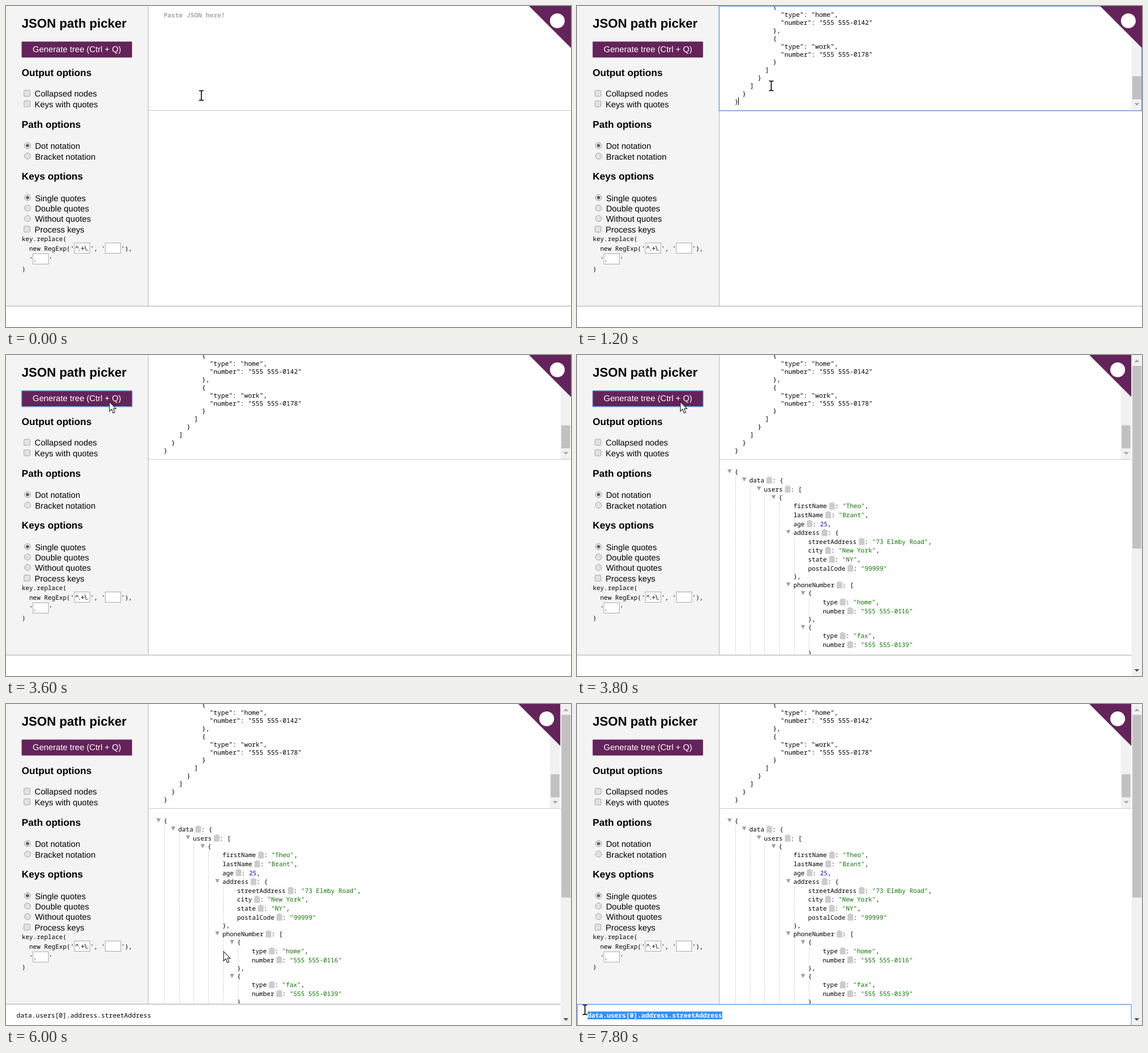
An HTML page that plays this animation: 992 px wide and 564 px high, repeating every 8000 ms.

```html
<!DOCTYPE html>
<html lang="en">
<head>
<meta charset="utf-8">
<title>JSON path picker</title>
<style>
  html, body { margin: 0; width: 100%; height: 100%; overflow: hidden; background: #fff; }
  svg { display: block; width: 992px; height: 564px; }
  text { white-space: pre; text-rendering: geometricPrecision; fill: #000; }
  .ui { font: 14.7px "Liberation Sans", Arial, sans-serif; }
  .h1 { font: bold 22.1px "Liberation Sans", Arial, sans-serif; }
  .h2 { font: bold 17.15px "Liberation Sans", Arial, sans-serif; }
  .field { font: 12.27px "Liberation Sans", Arial, sans-serif; }
  .code { font: 10.93px "Noto Sans Mono", "DejaVu Sans Mono", monospace; }
  .area { font: 11.23px "Noto Sans Mono", "DejaVu Sans Mono", monospace; }
  .path { font: 11.26px "Noto Sans Mono", "DejaVu Sans Mono", monospace; }
  .str { fill: #0b7500; }
  .num { fill: #1a01cc; }
  .hint { fill: #a9a9a9; font-weight: 600; }
  .picked { fill: #fff; font-weight: 600; }
  .focus { fill: none; stroke: #6b9fe0; stroke-width: 1.4; }
  .box { fill: #fff; stroke: #a9a9a9; }
  .tick { fill: #e2e2e2; stroke: #a6a6a6; }
  .guide { stroke: #c4c4c4; stroke-dasharray: 1 1; }
</style>
</head>
<body>
<svg viewBox="0 0 992 564">
  <defs>
    <path id="clip" d="M0-9.2h3v-.8q0-.6.6-.6h2.8q.6 0 .6.6v.8h3V2H0z"/>
    <path id="fold" d="M-3.8-3.6h7.6L0 3.6z" fill="#a0a0a0"/>
    <clipPath id="selClip"><rect id="selArea" y="535" height="25"/></clipPath>
  </defs>

  <g id="side">
    <rect width="249" height="528" fill="#f4f4f4"/>
    <path d="M249.5 0V528" stroke="#c2c2c2"/>
    <path d="M250.5 0V528" stroke="#ececec"/>
    <rect x="27.5" y="62.6" width="193.8" height="28" rx="1" fill="#64235a"/>
    <rect id="btnFocus" class="focus" x="27.5" y="62.7" width="194" height="28" rx="1"/>
    <text class="ui" x="124.5" y="81" text-anchor="middle" style="fill:#fff">Generate tree (Ctrl + Q)</text>
  </g>

  <path d="M250 183.5H992" stroke="#cacaca"/>
  <text id="hint" class="area hint" x="276.7" y="20.2">Paste JSON here!</text>
  <g id="json"></g>
  <g id="tree"></g>

  <g id="areaBar">
    <rect x="973.5" y="1" width="17.5" height="182" fill="#f1f1f1"/>
    <rect x="975" y="123.5" width="15.5" height="40.5" fill="#c1c1c1"/>
    <path d="M978.5 170.5h9l-4.5 4.5z" fill="#a3a3a3"/>
  </g>
  <rect id="areaFocus" class="focus" x="249.5" y=".5" width="742" height="183.5"/>
  <g id="ribbon">
    <path d="M918.3 0H992v73.7z" fill="#64235a"/>
    <circle cx="968" cy="26" r="13" fill="#fff"/>
  </g>
  <path id="areaCaret" stroke="#000" stroke-width="1.1"/>

  <rect y="527" width="992" height="37" fill="#fff"/>
  <g id="pathEdge">
    <path d="M0 526.7H992" stroke="#dcdcdc"/>
    <path d="M0 527.7H992" stroke="#b8b8b8"/>
  </g>
  <path id="pathFocus" class="focus" d="M.5 564V527.8H973.2V564"/>
  <g id="result">
    <text class="path" x="18.5" y="551">data.users[0].address.streetAddress</text>
    <g clip-path="url(#selClip)">
      <rect x="18.5" y="540.3" width="236.7" height="13.7" fill="#3390ff"/>
      <text class="path picked" x="18.5" y="551">data.users[0].address.streetAddress</text>
    </g>
  </g>
  <path id="pathCaret" d="M255.8 540.5V553.5" stroke="#000" stroke-width="1.1"/>

  <g id="pageBar">
    <rect x="973.7" width="18.3" height="564" fill="#f1f1f1"/>
    <rect x="975.2" y="19" width="15.8" height="321" fill="#c1c1c1"/>
    <path d="M978.5 12.5h9L983 8z" fill="#a3a3a3"/>
    <path d="M978.5 552h9l-4.5 4.5z" fill="#505050"/>
  </g>

  <g id="pointer">
    <path id="beam" d="M-4-8.3h2.5Q0-8.3 0-7 0-8.3 1.5-8.3H4M0-7.5V7.8M-4 8.6h2.5Q0 8.6 0 7.3 0 8.6 1.5 8.6H4" fill="none" stroke="#000" stroke-width="1.6"/>
    <path id="arrow" d="M.5.3V17l3.9-3.7L7 20l3-1.2-2.8-6.4h5z" fill="#fff" stroke="#26263a" stroke-width="1.1"/>
    <path id="hand" d="M-1.8 15V.8q0-1.8 1.7-1.8t1.7 1.8V8q.4-1.4 1.9-1.2 1.5.1 1.6 1.6.5-1.1 1.9-.9 1.4.2 1.5 1.7.7-.8 1.8-.4 1.2.4 1.2 2v4.8q0 2.6-1.8 4.6V24H.6v-3.2L-5.2 13q-1-1.6.2-2.4 1.2-.7 2.2.9z" fill="#fff" stroke="#000" stroke-width="1.2"/>
  </g>
</svg>

<script>
const $ = id => document.getElementById(id);

function add(parent, tag, attrs, text) {
  const node = document.createElementNS('http://www.w3.org/2000/svg', tag);
  for (const name in attrs) node.setAttribute(name, attrs[name]);
  if (text !== undefined) node.textContent = text;
  parent.appendChild(node);
  return node;
}
const write = (parent, cls, x, y, text) => add(parent, 'text', { class: cls, x, y }, text);

function buildSide() {
  const side = $('side');
  write(side, 'h1', 27.5, 38.4, 'JSON path picker');
  ['Output options', 'Path options', 'Keys options'].forEach((s, i) =>
    write(side, 'h2', 27.5, 123 + i * 91.2, s));

  const check = (y, label) => {
    add(side, 'rect', { class: 'tick', x: 31.5, y: y - 11, width: 10.6, height: 10.6, rx: 1.5 });
    write(side, 'ui', 50.3, y, label);
  };
  const radio = (y, label, on) => {
    add(side, 'circle', { class: 'tick', cx: 37.8, cy: y - 5.9, r: 5.4 });
    if (on) add(side, 'circle', { cx: 37.8, cy: y - 5.9, r: 2.7, fill: '#5c5c5c' });
    write(side, 'ui', 51, y, label);
  };
  check(159.1, 'Collapsed nodes');
  check(177.6, 'Keys with quotes');
  radio(251.2, 'Dot notation', true);
  radio(269.6, 'Bracket notation');
  radio(342.6, 'Single quotes', true);
  radio(360.9, 'Double quotes');
  radio(379.3, 'Without quotes');
  check(397.8, 'Process keys');

  const field = (x, y, text) => {
    add(side, 'rect', { class: 'box', x, y, width: 27.2, height: 18.2 });
    write(side, 'field', x + 1.8, y + 13.2, text);
  };
  write(side, 'code', 27.7, 413, 'key.replace(');
  write(side, 'code', 40.8, 429.7, "new RegExp('");
  field(120, 416.3, '^.+\\.');
  write(side, 'code', 147.8, 429.7, "', '");
  field(174.3, 416.3, '');
  write(side, 'code', 202, 429.7, "'),");
  write(side, 'code', 40.8, 448.5, "'");
  field(47.2, 435.3, '.');
  write(side, 'code', 75, 448.5, "'");
  write(side, 'code', 27.7, 466, ')');
}

function buildJson() {
  const lines = [
    [5, '{'], [6, '"type": "home",'], [6, '"number": "555 555-0142"'], [5, '},'],
    [5, '{'], [6, '"type": "work",'], [6, '"number": "555 555-0178"'], [5, '}'],
    [4, ']'], [3, '}'], [2, ']'], [1, '}'], [0, '}']
  ];
  lines.forEach(([depth, s], i) =>
    write($('json'), 'area', 276.7 + depth * 13.48, 5.4 + i * 13.85, s));
}

let hoverIcon;
function buildTree() {
  const tree = $('tree'), cw = 6.56;
  const rows = [
    [0, '', '{'], [1, 'data', '{'], [2, 'users', '['], [3, '', '{'],
    [4, 'firstName', '"Theo"', ','], [4, 'lastName', '"Brant"', ','], [4, 'age', '25', ','],
    [4, 'address', '{'],
    [5, 'streetAddress', '"73 Elmby Road"', ','], [5, 'city', '"New York"', ','],
    [5, 'state', '"NY"', ','], [5, 'postalCode', '"99999"', ''],
    [4, '', '},'], [4, 'phoneNumber', '['],
    [5, '', '{'], [6, 'type', '"home"', ','], [6, 'number', '"555 555-0116"', ''], [5, '', '},'],
    [5, '', '{'], [6, 'type', '"fax"', ','], [6, 'number', '"555 555-0139"', ''], [5, '', '}']
  ];
  const left = depth => 276.7 + depth * 25.8;
  let y = 194.4;
  for (const [depth, key, value, tail] of rows) {
    const top = y + 5;
    y += key ? 15.6 : 14.1;
    let x = left(depth);
    for (let d = 0; d < depth; d++) {
      const gx = Math.floor(left(d) + 1.5) + .5;
      add(tree, 'path', { class: 'guide', d: `M${gx} ${Math.round(top)}V${Math.round(y + 5)}` });
    }
    if (/^[{[]$/.test(value)) add(tree, 'use', { href: '#fold', x: x - 8.9, y: y - (key ? 5.2 : 4) });
    if (key) {
      write(tree, 'code', x, y, key);
      x += key.length * cw;
      const icon = add(tree, 'use', { href: '#clip', x: x + 3.8, y, fill: '#ccc' });
      if (key === 'streetAddress') hoverIcon = icon;
      write(tree, 'code', x + 14, y, ':');
      x += 14 + 2 * cw;
    }
    const kind = value[0] === '"' ? ' str' : value === '25' ? ' num' : '';
    write(tree, 'code' + kind, x, y, value);
    if (tail) write(tree, 'code', x + value.length * cw, y, tail);
  }
}

const easeOut = (u, p) => 1 - (1 - u) ** p;
const smooth = u => u * u * (3 - 2 * u);
const mix = (a, b, u) => a + (b - a) * u;
const part = (t, from, to) => Math.min(1, Math.max(0, (t - from) / (to - from)));

function pointerAt(t) {
  if (t < 400) return [343, 157];
  if (t < 4000) {
    const u = part(t, 2200, 3400);
    return [mix(341, 181, easeOut(u, 2.6)), mix(140, 82, easeOut(u, 2))];
  }
  if (t < 5600) {
    const u = smooth(part(t, 4000, 5200));
    return [mix(181, 500, u), mix(82, 325, u)];
  }
  if (t < 6800) {
    const u = smooth(part(t, 5400, 6600));
    return [mix(500, 263, u), mix(325, 544, u)];
  }
  const u = smooth(part(t, 6800, 7800));
  return [mix(263, 14, u), mix(544, 537, u)];
}

const show = (id, on) => $(id).setAttribute('visibility', on ? 'visible' : 'hidden');
const within = (t, a, b) => t >= a && t < b;

function render(now) {
  // The screen refreshes five times a second.
  const t = Math.floor(now % 8000 / 200) * 200;
  const pasted = t >= 1200, built = t >= 3800;

  show('hint', !pasted);
  show('json', pasted);
  show('areaBar', pasted);
  show('areaFocus', within(t, 200, 3600));
  show('areaCaret', within(t, 200, 800) || within(t, 1200, 1800) || within(t, 2400, 2800));
  $('areaCaret').setAttribute('d', pasted ? 'M283.5 160.5V174' : 'M277.7 9.5V23');
  show('btnFocus', within(t, 3600, 5600));
  show('tree', built);
  show('pageBar', built);
  const shift = `translate(${built ? -18.7 : 0} 0)`;
  $('areaBar').setAttribute('transform', shift);
  $('ribbon').setAttribute('transform', shift);

  const [x, y] = pointerAt(t);
  const onIcon = built && Math.hypot(x - 500, y - 327) < 7;
  const onText = y > 528 || (x > 250 && y < 184);
  $('pointer').setAttribute('transform', `translate(${x.toFixed(1)} ${y.toFixed(1)})`);
  show('hand', onIcon);
  show('beam', onText && !onIcon);
  show('arrow', !onText && !onIcon);
  hoverIcon.setAttribute('fill', onIcon ? '#666' : '#ccc');

  show('result', t >= 5600);
  show('pathEdge', t < 6800);
  show('pathFocus', t >= 6800);
  show('pathCaret', t === 6800);
  const chars = t > 6800 ? Math.min(35, Math.max(0, Math.round((255 - x) / 6.757))) : 0;
  $('selArea').setAttribute('x', 255.2 - chars * 6.763);
  $('selArea').setAttribute('width', chars * 6.763);
}

buildSide();
buildJson();
buildTree();
const start = performance.now();
function loop() {
  render(performance.now() - start);
  requestAnimationFrame(loop);
}
loop();
</script>
</body>
</html>
```
